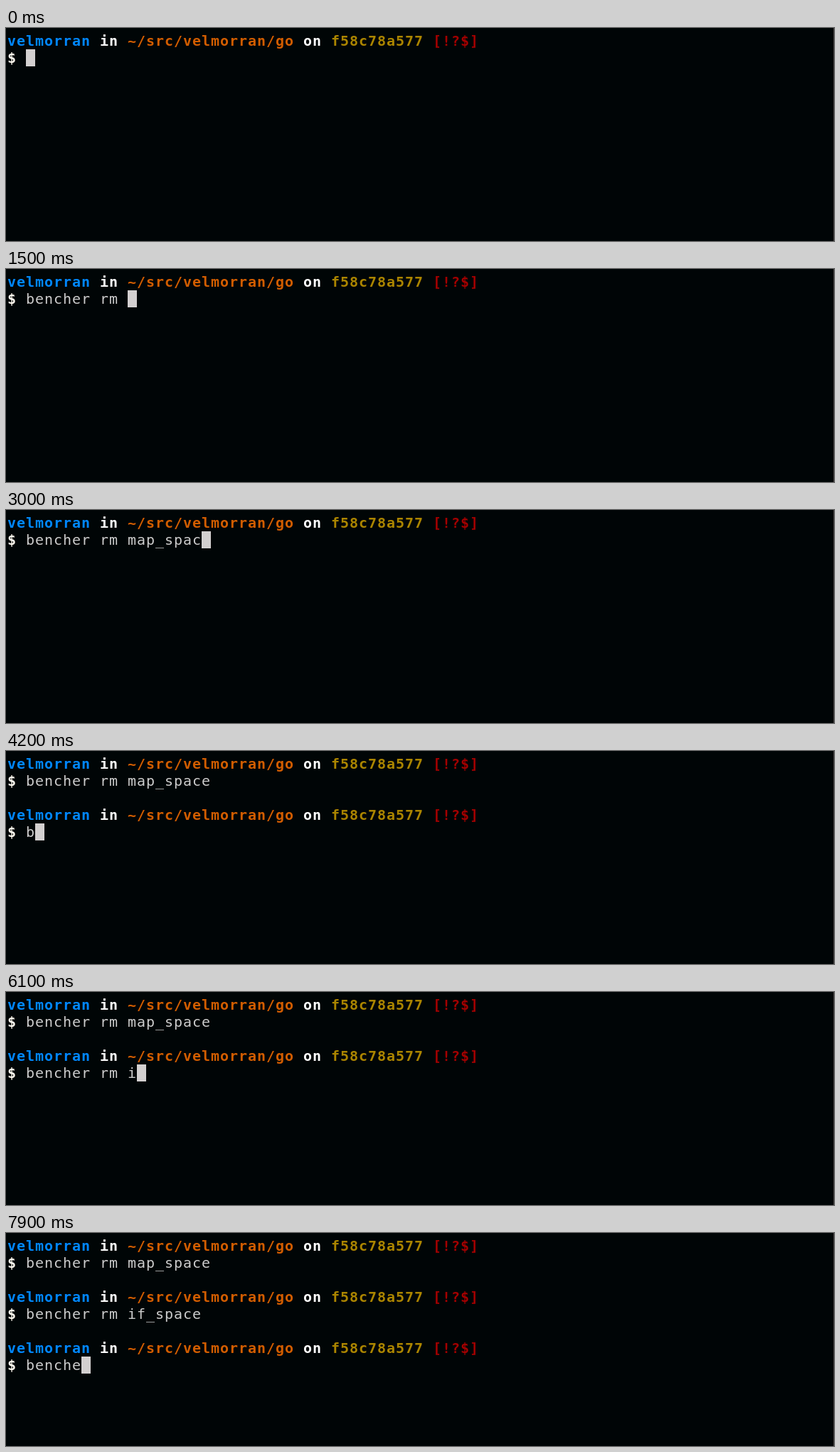
Write an HTML page that moves like this. It is 1164x300 px and loops after 8000 ms.

```html
<!DOCTYPE html>
<html lang="en">
<head>
<meta charset="utf-8">
<title>Terminal</title>
<style>
  html, body { margin: 0; width: 100%; height: 100%; overflow: hidden; background: #000506; }
  #term { position: relative; width: 1164px; height: 300px; overflow: hidden; background: #000506; }
  #edge { position: absolute; right: 0; top: 0; width: 1px; height: 300px; background: #383434; }
  #cursor { position: absolute; width: 13px; height: 24px; background: #d3d0d0; }
  .row {
    position: absolute; left: 2px; height: 24px; white-space: pre; color: #cccccc;
    font: 20px/24px "DejaVu Sans Mono", monospace; font-variant-ligatures: none;
  }
  b { color: #fff; }
  .user { color: #0087ff; }
  .path { color: #d25d00; }
  .rev { color: #ab8500; }
  .flags { color: #a40000; }
  .sign { color: #fffbf0; }
</style>
</head>
<body>
<div id="term"><div id="edge"></div><div id="cursor"></div></div>
<script>
const LOOP = 8000, CELL = 13, LINE = 24, LEFT = 2, TOP = 6;
const KEY_GAP = 100, REPLY_DELAY = 200;
const USER = 'velmorran';

// Bursts of typing: start in ms, the keys, and optionally the time per key.
const BURSTS = [
  [200, 'b'], [400, 'enche'], [1000, 'r r'], [1400, 'm '],
  [2100, 'ma'], [2400, 'p_s'], [2800, 'pac'], [3200, 'e\n'],
  [4200, 'benche'], [4900, 'r r'], [5300, 'm ', 0],
  [6100, 'if'], [6400, '_s'], [6700, 'pac', 50], [7000, 'e\n'],
  [7400, 'benche']
];
const KEYS = BURSTS.flatMap(([start, text, gap = KEY_GAP]) =>
  [...text].map((key, i) => ({ key, at: start + i * gap })));

const term = document.getElementById('term');
const cursor = document.getElementById('cursor');

function addRow(line, html) {
  const row = document.createElement('div');
  row.className = 'row';
  row.style.top = TOP + line * LINE + 'px';
  row.innerHTML = html;
  term.append(row);
  return row;
}

// Snap the font's advance to the terminal cell.
const probe = addRow(0, 'x'.repeat(100));
const spacing = CELL - probe.getBoundingClientRect().width / 100;
probe.remove();

function addPrompt(line) {
  const head = addRow(line,
    `<b class="user">${USER}</b> <b>in</b> <b class="path">~/src/${USER}/go</b> ` +
    '<b>on</b> <b class="rev">f58c78a577</b> <b class="flags">[!?$]</b>');
  const input = addRow(line + 1, '<b class="sign">$</b> <span></span>');
  const rows = [head, input];
  for (const row of rows) row.style.letterSpacing = spacing + 'px';
  return { rows, typed: input.querySelector('span') };
}

const prompts = [0, 3, 6].map(addPrompt);

function draw(time) {
  const pressed = KEYS.filter(k => k.at <= time);
  const commands = pressed.map(k => k.key).join('').split('\n');
  const active = commands.length - 1;
  const last = pressed.at(-1);
  const waiting = last?.key === '\n' && time < last.at + REPLY_DELAY;

  prompts.forEach(({ rows, typed }, i) => {
    const visible = i < active || (i === active && !waiting);
    for (const row of rows) row.hidden = !visible;
    const text = commands[i] ?? '';
    if (typed.textContent !== text) typed.textContent = text;
  });

  const col = waiting ? 0 : 2 + commands[active].length;
  const line = active * 3 + (waiting ? -1 : 1);
  cursor.style.left = LEFT + col * CELL + 'px';
  cursor.style.top = TOP + line * LINE + 'px';
}

const origin = performance.now();
function tick() {
  draw((performance.now() - origin) % LOOP);
  requestAnimationFrame(tick);
}
tick();
</script>
</body>
</html>
```
